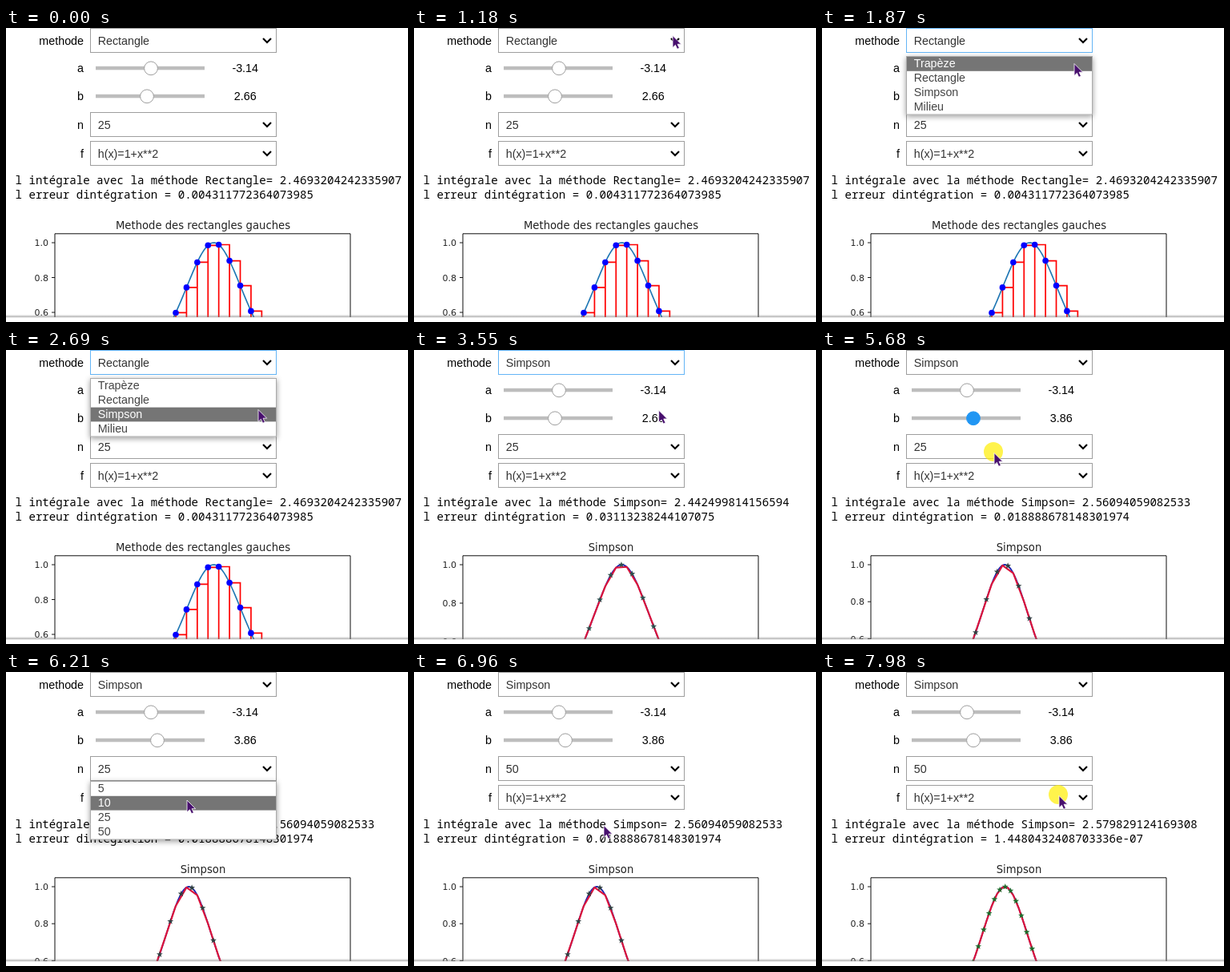
An HTML page for the animation above (8 s loop, 502 px wide and 367 px high).

```html
<!DOCTYPE html>
<html lang="fr">
<head>
<meta charset="utf-8">
<title>Intégration numérique</title>
<style>
html, body { margin: 0; width: 100%; height: 100%; overflow: hidden; background: #fff; }
svg { display: block; width: 100vw; height: 100vh; }
text { white-space: pre; }
.ui { font: 14.3px "Liberation Sans", Arial, sans-serif; }
.out { font: 14.11px "Noto Sans Mono", monospace; }
.plot { font: 11px "DejaVu Sans", sans-serif; fill: #222; }
.title { font-size: 13.2px; }
</style>
</head>
<body>
<svg id="stage" viewBox="0 0 502 367">
  <defs>
    <clipPath id="page"><rect width="502" height="361"/></clipPath>
    <filter id="shadow" x="-10%" y="-30%" width="120%" height="160%">
      <feDropShadow dx="0" dy="2" stdDeviation="3.5" flood-opacity=".4"/>
    </filter>
    <linearGradient id="edge" x1="0" y1="0" x2="0" y2="1">
      <stop offset="0" stop-color="#777" stop-opacity="0"/>
      <stop offset="1" stop-color="#777" stop-opacity=".6"/>
    </linearGradient>
  </defs>
  <g id="output" clip-path="url(#page)"></g>
  <rect y="357.5" width="502" height="3.7" fill="url(#edge)"/>
  <g id="form" class="ui"></g>
  <g id="pointer">
    <circle id="press" r="12" fill="#ffee00" fill-opacity=".7"/>
    <path d="M1 1.5V16.5L4.4 13.3L6.7 18.3L9.4 17.1L7.1 12.2H11.7Z" fill="#48106e" stroke="#fff" stroke-width=".8"/>
  </g>
</svg>
<script>
const LOOP = 8000;
const $ = id => document.getElementById(id);
const between = (t, a, b) => t >= a && t < b;

// Pointer moves: start, end, number of steps, destination
const ENTRY = { time: 130, x: 418, y: 332 };
const MOVES = [
  [130, 340, 4, 357, 76],
  [620, 1180, 9, 322, 8],
  [1640, 1870, 4, 314, 43],
  [1950, 2220, 5, 314, 57],
  [2480, 2690, 4, 314, 73],
  [3480, 4250, 12, 188, 84],
  [4910, 5330, 7, 214, 127],
  [5950, 6480, 8, 236, 190],
  [7150, 7790, 10, 295, 153]
];
const PRESSES = [[1500, 1640], [3150, 3290], [4580, 4780], [5680, 5810], [6820, 6960], [7980, LOOP]];

const METHODS = ["Trapèze", "Rectangle", "Simpson", "Milieu"];
const COUNTS = ["5", "10", "25", "50"];

// unit: pixels per 1.0 on the vertical axis
const RESULTS = [
  { from: 0, method: "Rectangle", b: 2.66, n: 25, unit: 217.5,
    value: "2.4693204242335907", error: "0.004311772364073985" },
  { from: 3480, method: "Simpson", b: 2.66, n: 25, unit: 240, star: "#2f4f4f",
    value: "2.442499814156594", error: "0.03113238244107075" },
  { from: 4840, method: "Simpson", b: 3.86, n: 25, unit: 231, star: "#2f3f42",
    value: "2.56094059082533", error: "0.018888678148301974" },
  { from: 7150, method: "Simpson", b: 3.86, n: 50, unit: 231, star: "#1d6b2c",
    value: "2.579829124169308", error: "1.4480432408703336e-07" }
];

function pointerAt(t) {
  let { x, y } = ENTRY;
  for (const [start, end, steps, toX, toY] of MOVES) {
    if (t < start) break;
    const first = start === ENTRY.time ? 0 : 1;
    const step = Math.floor((t - start) / (end - start) * (steps - 1) + 1e-6) + first;
    const p = Math.min(1, step / (steps - 1 + first));
    const k = p * p * (3 - 2 * p);
    x += (toX - x) * k;
    y += (toY - y) * k;
  }
  return { x, y };
}

const label = (x, y, s, attrs = "") => `<text x="${x}" y="${y}" ${attrs}>${s}</text>`;

function select(name, y, value, focused) {
  return label(97, y + 20.5, name, 'text-anchor="end"') +
    `<rect x="105.5" y="${y + .5}" width="232" height="30" fill="#fff" stroke="${focused ? "#64b5f6" : "#9e9e9e"}"/>` +
    label(114.7, y + 21, value, 'fill="#333"') +
    `<path d="M321 ${y + 13}l5 5l5-5" fill="none" stroke="#000" stroke-width="2.2"/>`;
}

function slider(name, y, value, x, active) {
  return label(97, y + 5, name, 'text-anchor="end"') +
    `<rect x="112" y="${y - 2.2}" width="136" height="4.5" fill="#bdbdbd"/>` +
    `<circle cx="${x}" cy="${y + .3}" r="8.4" fill="${active ? "#2196f3" : "#fff"}" stroke="${active ? "#2196f3" : "#9e9e9e"}"/>` +
    label(298.7, y + 5, value, 'text-anchor="middle"');
}

function popup(y, options, selected, pointerY) {
  const rowHeight = 17.8;
  const hovered = Math.floor((pointerY - y) / rowHeight);
  const current = options[hovered] ? hovered : selected;
  const rows = options.map((option, i) => {
    const top = y + 1 + i * rowHeight;
    const on = i === current;
    return (on ? `<rect x="106" y="${top}" width="231" height="${rowHeight}" fill="#757575"/>` : "") +
      label(114.7, top + 13.3, option, `fill="${on ? "#fff" : "#444"}"`);
  });
  return `<rect x="105.5" y="${y + .5}" width="232" height="72.5" fill="#fff" stroke="#aaa" filter="url(#shadow)"/>` + rows.join("");
}

function star(x, y, color) {
  const points = Array.from({ length: 10 }, (_, i) => {
    const r = i % 2 ? 1.7 : 4.1, a = i * Math.PI / 5;
    return [x + r * Math.sin(a), y - r * Math.cos(a)].map(v => v.toFixed(2));
  });
  return `<polygon points="${points.join(" ")}" fill="${color}"/>`;
}

function chart({ method, b, n, unit, star: starColor }) {
  const a = -3.14, left = 77.8, span = 335.5;
  const f = x => 1 / (1 + x * x);
  const at = u => [left + span * u, 268 + unit * (1 - f(a + (b - a) * u))];
  const range = (count, shift = 0) => Array.from({ length: count }, (_, i) => at((i + shift) / n));
  const line = (points, color, width) =>
    `<polyline points="${points.map(p => p.map(v => v.toFixed(2))).join(" ")}" fill="none" stroke="${color}" stroke-width="${width}" stroke-linejoin="round"/>`;
  const nodes = range(n + 1);
  const curve = Array.from({ length: 201 }, (_, i) => at(i / 200));

  let marks;
  if (method === "Rectangle") {
    const bars = nodes.slice(0, -1).map(([x, y], i) => `M${x} 400V${y}H${nodes[i + 1][0]}V400`).join("");
    marks = line(curve, "#1f77b4", 1.65) +
      `<path d="${bars}" fill="none" stroke="#f00" stroke-width="1.7"/>` +
      nodes.map(([x, y]) => `<circle cx="${x}" cy="${y}" r="3.8" fill="#00f"/>`).join("");
  } else {
    marks = line(curve, "#1420b0", 1.8) + line(nodes, "#dc143c", 2.2) +
      range(n, .5).map(([x, y]) => star(x, y, starColor)).join("");
  }

  const ticks = [1, .8, .6].map(v => {
    const y = 268 + unit * (1 - v);
    return `<path d="M57 ${y}H61" stroke="#000" stroke-width=".9"/>` +
      label(53, y + 4.2, v.toFixed(1), 'text-anchor="end"');
  }).join("");
  const title = method === "Rectangle" ? "Methode des rectangles gauches" : method;
  return marks + '<path d="M61 400V256.8H430V400" fill="none" stroke="#000" stroke-width=".95"/>' +
    `<g class="plot">${ticks}${label(246, 250.5, title, 'class="title" text-anchor="middle"')}</g>`;
}

function output(result) {
  return `<g class="out">` +
    label(11.5, 195, `l intégrale avec la méthode ${result.method}= ${result.value}`) +
    label(11.5, 213, `l erreur dintégration = ${result.error}`) +
    `</g>` + chart(result);
}

function form(t, pointerY) {
  const moved = t >= 4650;
  let s = select("methode", 0, t < 3290 ? "Rectangle" : "Simpson", between(t, 1500, 4650)) +
    slider("a", 50, "-3.14", 181) +
    slider("b", 85, moved ? "3.86" : "2.66", moved ? 189 : 176, between(t, 4650, 5740)) +
    select("n", 105, t < 6960 ? "25" : "50") +
    select("f", 141, "h(x)=1+x**2");
  if (between(t, 1570, 3290)) s += popup(35, METHODS, 1, pointerY);
  if (between(t, 5740, 6960)) s += popup(136, COUNTS, 2, pointerY);
  return s;
}

const shown = {};
function put(id, markup) {
  if (shown[id] !== markup) $(id).innerHTML = shown[id] = markup;
}

function render(t) {
  const { x, y } = pointerAt(t);
  put("output", output(RESULTS.filter(r => t >= r.from).pop()));
  put("form", form(t, y + 1));
  $("pointer").setAttribute("transform", `translate(${x} ${y})`);
  $("pointer").setAttribute("visibility", t < ENTRY.time ? "hidden" : "visible");
  $("press").setAttribute("opacity", PRESSES.some(([a, b]) => between(t, a, b)) ? 1 : 0);
}

const begin = performance.now();
function tick() {
  render((performance.now() - begin) % LOOP);
  requestAnimationFrame(tick);
}
render(0);
requestAnimationFrame(tick);
</script>
</body>
</html>
```
